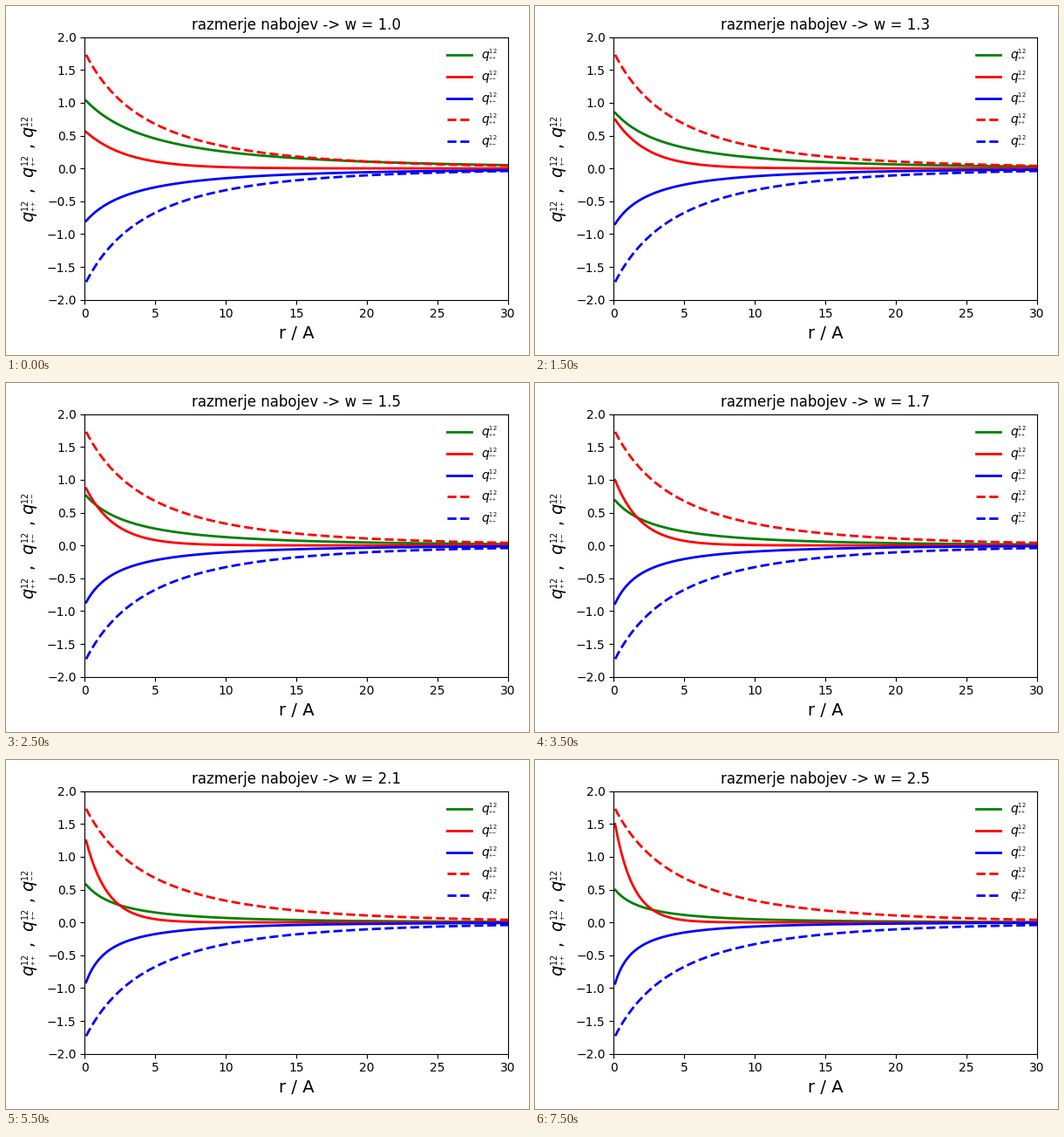
A matplotlib script for the animation above (8000 ms loop, 600 by 400 pixels).

```python
import numpy as np
import matplotlib.pyplot as plt
from matplotlib.animation import FuncAnimation

FRAMES, INTERVAL = 16, 500
R0 = 0.1
r = np.linspace(R0, 30, 300)


def screened(start, rate, slope):
    """Screened decay that equals `start` at r = R0."""
    d = r - R0
    return np.exp(-rate * d) / (1 / start + slope * d)


def charges(w):
    """The ++, -- and +- curves for charge ratio w."""
    rate = 0.04 * np.sqrt(w)
    pp = screened(1.43 / (w + 0.388), rate, 0.172 * w**1.82)
    mm = screened(0.555 + 0.627 * (w - 1), 0.05 + 0.29 * w, 0)
    pm = -screened(1.043 * w / (w + 0.304), rate, 0.33 * w**0.9)
    return pp, mm, pm


def label(signs):
    """q with a compact 12 stacked over the unspaced signs."""
    tight = "".join(f"{{{s}}}" for s in signs)
    return r"$q\genfrac{}{}{0}{2}{12}{_{" + tight + "}}$"


PP, MM, PM = map(label, ("++", "--", "+-"))

fig, ax = plt.subplots(figsize=(6, 4), dpi=100)
fig.subplots_adjust(left=0.1505, right=0.96, bottom=0.1583, top=0.911)
solid = [ax.plot(r, y, color=c, lw=2, label=s)[0]
         for y, c, s in zip(charges(1.0), ("green", "red", "blue"), (PP, MM, PM))]
fixed = screened(1.73, 0.065, 0.102)
ax.plot(r, fixed, "--", color="red", lw=2, label=PP)
ax.plot(r, -fixed, "--", color="blue", lw=2, label=PM)

ax.set_xlim(0, 30)
ax.set_ylim(-2, 2)
ax.set_xlabel("r / A", fontsize=14)
ax.set_ylabel(f"{PP} ,  {PM} , {MM}", fontsize=14)
title = ax.set_title("razmerje nabojev -> w = 1.0")
ax.legend(loc="upper right", frameon=False)


def update(i):
    w = 1 + i / 10
    for line, y in zip(solid, charges(w)):
        line.set_ydata(y)
    title.set_text(f"razmerje nabojev -> w = {w:.1f}")
    return [*solid, title]


anim = FuncAnimation(fig, update, frames=FRAMES, interval=INTERVAL,
                     repeat=True, repeat_delay=0, blit=False)
plt.show()
```
